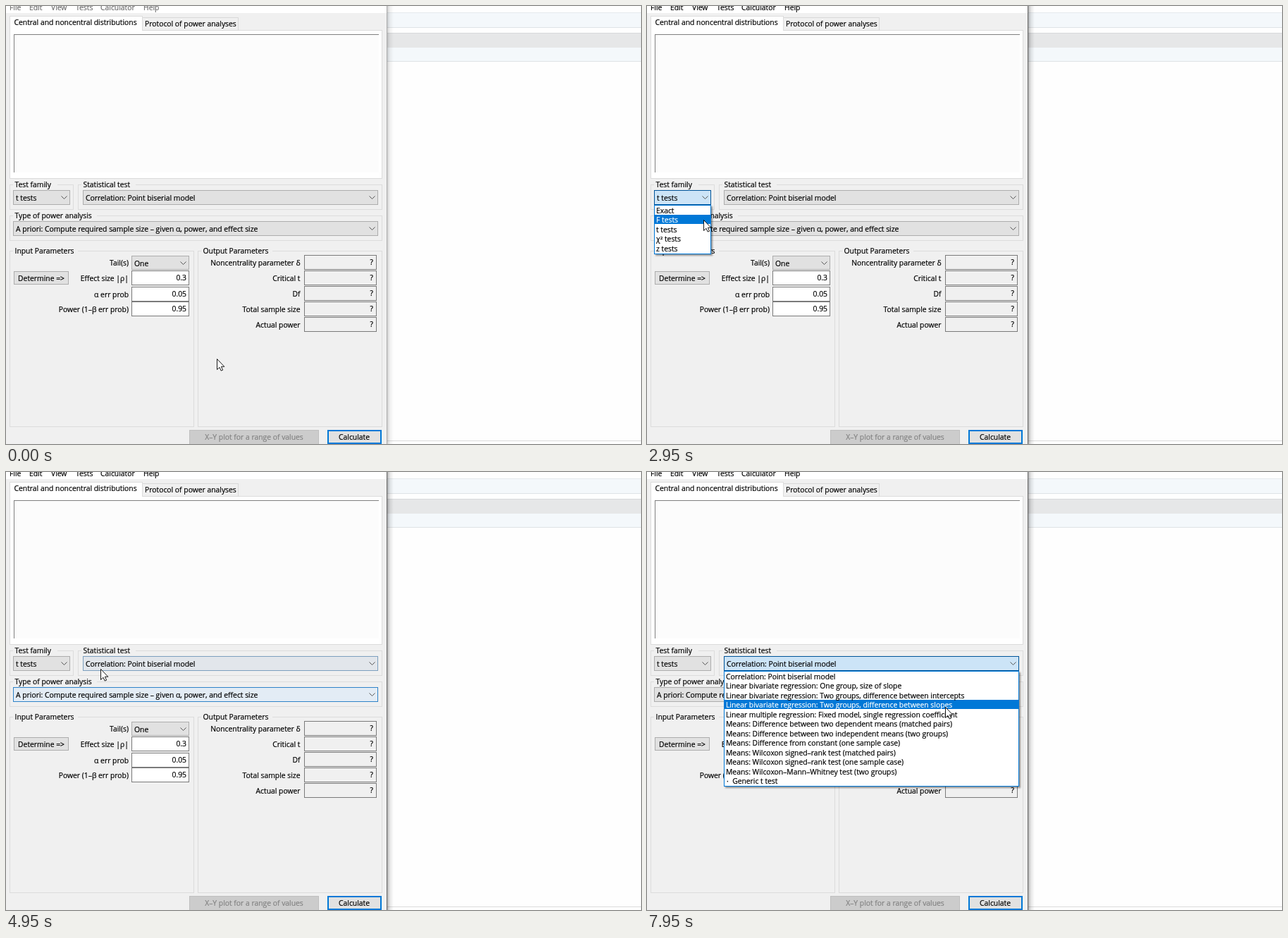
Recreate the animation shown at these times as an HTML page. Size 901 by 621 pixels, loop 8 s.

```html
<!DOCTYPE html>
<html lang="en">
<head>
<meta charset="utf-8">
<title>Power analysis</title>
<style>
html, body { margin: 0; width: 100%; height: 100%; overflow: hidden; background: #fff; }
svg { display: block; width: 901px; height: 621px; }
text { font: 10.35px "Open Sans", "Noto Sans", sans-serif; stroke-width: .2px; white-space: pre; }
rect { shape-rendering: crispEdges; }
</style>
</head>
<body>
<svg id="stage" viewBox="0 0 901 621" xmlns="http://www.w3.org/2000/svg">
  <defs>
    <linearGradient id="shade"><stop offset="0" stop-opacity=".3"/><stop offset=".4" stop-opacity=".1"/><stop offset="1" stop-opacity="0"/></linearGradient>
    <filter id="drop" x="-10%" y="-10%" width="120%" height="120%"><feDropShadow dx="2" dy="2" stdDeviation="1" flood-opacity=".4"/></filter>
  </defs>
</svg>
<script>
const stage = document.getElementById("stage");
const BLUE = "#0078d7";

function add(tag, attrs, parent = stage) {
  const node = document.createElementNS("http://www.w3.org/2000/svg", tag);
  for (const key in attrs) node.setAttribute(key, attrs[key]);
  return parent.appendChild(node);
}
function rect(x, y, width, height, fill, parent) {
  return add("rect", { x, y, width, height, fill }, parent);
}
function box(x, y, w, h, fill, stroke, parent) {
  const node = rect(x + .5, y + .5, w - 1, h - 1, fill, parent);
  node.setAttribute("stroke", stroke);
  return node;
}
function label(str, x, y, anchor = "start", color = "#000", parent) {
  const node = add("text", { x, y, fill: color, stroke: color, "text-anchor": anchor }, parent);
  node.textContent = str;
  return node;
}
function paint(node, fill, stroke) {
  node.setAttribute("fill", fill);
  node.setAttribute("stroke", stroke);
}
function show(node, on) {
  node.setAttribute("display", on ? "inline" : "none");
}
function combo(x, y, w, h, str) {
  const node = box(x, y, w, h, "#e1e1e1", "#adadad");
  label(str, x + 4, y + 15);
  add("path", { d: `M${x + w - 12.5} ${y + 8.5}l4 4 4-4`, fill: "none", stroke: "#555" });
  return node;
}
function group(title, x, y, w, h, titleWidth) {
  box(x, y, w, h, "none", "#dcdcdc");
  rect(x + 5, y - 4, titleWidth, 9, "#f0f0f0");
  label(title, x + 7.5, y + 4);
}

// Page behind the window
rect(541, 0, 360, 621, "#fefefe");
rect(541, 9, 360, 22, "#f4f8fb");
rect(541, 9, 360, 1, "#e6eaee");
rect(541, 30, 360, 1, "#dfe3e6");
rect(541, 38, 360, 21, "#e6e7e8");
rect(541, 38, 360, 1, "#d8dadc");
rect(541, 59, 360, 20, "#f4f8fb");
rect(541, 78, 360, 1, "#dfe3e6");
rect(541, 616, 360, 1, "#dcdcdc");
const shadow = rect(541, 0, 9, 621, "url(#shade)");

// Window, menu and tabs
rect(0, 0, 540, 621, "#f0f0f0");
rect(0, 0, 540, 10, "#fff");
const edge = rect(540, 0, 1, 621, "#666");
const menu = [["File", 5], ["Edit", 33], ["View", 64], ["Tests", 99], ["Calculator", 134], ["Help", 195]]
  .map(([str, x]) => label(str, x, 6));
box(5, 34, 529, 211, "#fff", "#dcdcdc");
box(193, 16, 137, 19, "#f0f0f0", "#d9d9d9");
box(5, 14, 189, 21, "#fff", "#dcdcdc");
rect(6, 33, 187, 3, "#fff");
label("Central and noncentral distributions", 11.5, 27);
label("Protocol of power analyses", 197, 29);
rect(11, 40, 518, 196, "#fcfcfc");
rect(11, 40, 518, 1, "#808080");
rect(11, 40, 1, 196, "#808080");

// Selectors
group("Test family", 5, 253, 91, 36, 63);
group("Statistical test", 102, 253, 432, 36, 77);
group("Type of power analysis", 5, 297, 529, 36, 119);
const family = combo(10, 261, 81, 21, "t tests");
const test = combo(109, 261, 419, 21, "Correlation: Point biserial model");
const kind = combo(10, 305, 518, 21, "A priori: Compute required sample size – given α, power, and effect size");

// Parameters
group("Input Parameters", 5, 347, 262, 250, 92);
group("Output Parameters", 272, 347, 262, 250, 101);
label("Tail(s)", 174, 368, "end");
combo(178, 354, 82, 20, "One");
box(11, 376, 78, 19, "#e1e1e1", "#adadad");
label("Determine =>", 50, 390, "middle");
[["Effect size |ρ|", "0.3", 375], ["α err prob", "0.05", 398], ["Power (1–β err prob)", "0.95", 419]]
  .forEach(([name, value, y]) => {
    box(178, y, 82, 21, "#fff", "#7a7a7a");
    label(name, 174, y + 15, "end");
    label(value, 256, y + 14, "end");
  });
["Noncentrality parameter δ", "Critical t", "Df", "Total sample size", "Actual power"]
  .forEach((name, i) => {
    const y = Math.round(353.4 + i * 21.8);
    box(423, y, 103, 21, "#f0f0f0", "#7a7a7a");
    label(name, 417.5, y + 15, "end");
    label("?", 521, y + 14, "end");
  });
box(260, 601, 184, 21, "#ccc", "#bfbfbf");
label("X–Y plot for a range of values", 352, 615, "middle", "#838383");
rect(456, 601, 77, 20, BLUE);
rect(458, 603, 73, 16, "#e1e1e1");
label("Calculate", 494, 615, "middle");

// Drop-down lists
const ROW = 13.5;
function dropdown(x, w, items) {
  const list = add("g", {});
  const h = items.length * ROW + 2;
  box(x, 282, w, Math.round(h), "#fff", BLUE, list).setAttribute("filter", "url(#drop)");
  const mark = rect(x + 1, 283, w - 2, 13, BLUE, list);
  const rows = items.map((str, i) =>
    label(str, x + (str.startsWith("·") ? 4 : 3), Math.round(293.6 + i * ROW), "start", "#000", list));
  return selected => {
    show(list, selected >= 0);
    mark.setAttribute("y", Math.floor(283 + selected * ROW));
    rows.forEach((row, i) => {
      const color = i === selected ? "#fff" : "#000";
      paint(row, color, color);
    });
  };
}
const pickFamily = dropdown(10, 81, ["Exact", "F tests", "t tests", "χ² tests", "z tests"]);
const pickTest = dropdown(109, 419, [
  "Correlation: Point biserial model",
  "Linear bivariate regression: One group, size of slope",
  "Linear bivariate regression: Two groups, difference between intercepts",
  "Linear bivariate regression: Two groups, difference between slopes",
  "Linear multiple regression: Fixed model, single regression coefficient",
  "Means: Difference between two dependent means (matched pairs)",
  "Means: Difference between two independent means (two groups)",
  "Means: Difference from constant (one sample case)",
  "Means: Wilcoxon signed–rank test (matched pairs)",
  "Means: Wilcoxon signed–rank test (one sample case)",
  "Means: Wilcoxon–Mann–Whitney test (two groups)",
  "·  Generic t test"
]);

const cursor = add("path", {
  d: "M.5 .5V15.5L4 12.3 6.2 17.1 8.6 16.1 6.4 11.3H10.8Z",
  fill: "#fff", stroke: "#000", "stroke-width": .9
});

const LOOK = {
  idle: ["#e1e1e1", "#adadad"],
  hover: ["#e5f1fb", BLUE],
  open: ["#cce4f7", "#005499"],
  fadeIn: ["#e2e6eb", "#7c9fbe"],
  fadeOut: ["#e3ecf5", "#2f83c8"]
};
const STEPS = [
  { at: 0, pos: [299, 500], inactive: true },
  { at: 1000, pos: [83, 270], inactive: true, family: "hover" },
  { at: 1950, pos: [83, 270], family: "open", familyRow: 2 },
  { at: 2950, pos: [80, 303], family: "open", familyRow: 1 },
  { at: 3950, pos: [81, 313], family: "open", familyRow: 2 },
  { at: 4950, pos: [134, 279], test: "fadeIn", kind: "fadeOut" },
  { at: 5950, pos: [135, 278], test: "open", testRow: 0 },
  { at: 6950, pos: [204, 275], test: "open", testRow: 0 },
  { at: 7950, pos: [423, 333], test: "open", testRow: 3 }
];

function render(time) {
  const step = STEPS.findLast(s => s.at <= time);
  const ink = step.inactive ? "#6d6d6d" : "#000";
  menu.forEach(item => paint(item, ink, ink));
  edge.setAttribute("fill", step.inactive ? "#aaa" : "#666");
  shadow.setAttribute("opacity", step.inactive ? .6 : 1);
  paint(family, ...LOOK[step.family || "idle"]);
  paint(test, ...LOOK[step.test || "idle"]);
  paint(kind, ...LOOK[step.kind || "idle"]);
  pickFamily(step.familyRow ?? -1);
  pickTest(step.testRow ?? -1);
  cursor.setAttribute("transform", `translate(${step.pos})`);
}

const start = performance.now();
function tick() {
  render((performance.now() - start) % 8000);
  requestAnimationFrame(tick);
}
tick();
</script>
</body>
</html>
```
